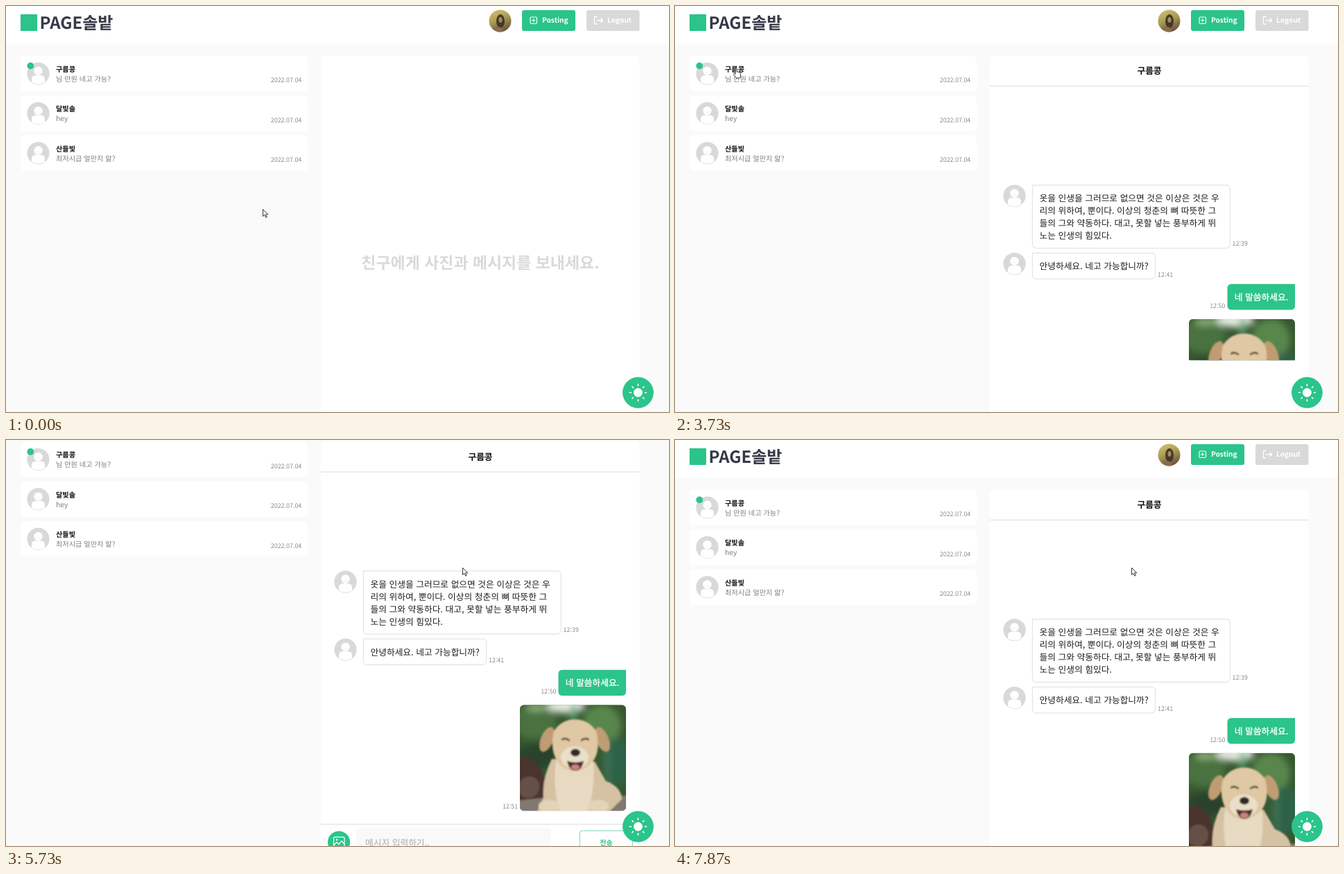
An HTML page for the animation above (7940 ms loop, 956x586 px).

```html
<!DOCTYPE html>
<html lang="ko">
<head>
<meta charset="utf-8">
<title>Chat</title>
<style>
  html, body { margin: 0; width: 100%; height: 100%; overflow: hidden; background: #fafafa; }
  svg { display: block; }
  text {
    font-family: "Noto Sans CJK KR", "Noto Sans KR", "Noto Sans", sans-serif;
    white-space: pre; text-rendering: geometricPrecision;
  }
</style>
</head>
<body>
<svg id="stage" width="956" height="586" viewBox="0 0 956 586"></svg>
<script>
const GREEN = '#2bc48a', GRAY = '#d9d9d9', INK = '#1c1c1c', MUTED = '#8c8c8c';
const LOOP = 7940;

// The page is a 1500 px layout shown at 956 px.
const PX = 956 / 1500;
const TINY = 14 * PX, SMALL = 16 * PX, BODY = 20 * PX, LARGE = 36 * PX;

const text = (x, y, str, size, fill, weight = 400, anchor = 'start') =>
  `<text x="${x}" y="${y}" font-size="${size}" fill="${fill}" font-weight="${weight}" text-anchor="${anchor}">${str}</text>`;
const rect = (x, y, w, h, fill, r = 0, extra = '') =>
  `<rect x="${x}" y="${y}" width="${w}" height="${h}" rx="${r}" fill="${fill}" ${extra}/>`;
const circle = (x, y, r, fill) => `<circle cx="${x}" cy="${y}" r="${r}" fill="${fill}"/>`;
const oval = (x, y, rx, ry, fill, turn = 0) =>
  `<ellipse cx="${x}" cy="${y}" rx="${rx}" ry="${ry}" fill="${fill}" transform="rotate(${turn} ${x} ${y})"/>`;
const path = (d, fill, extra = '') => `<path d="${d}" fill="${fill}" ${extra}/>`;
const line = (d, color, width) =>
  path(d, 'none', `stroke="${color}" stroke-width="${width}" stroke-linecap="round" stroke-linejoin="round"`);
const at = (x, y, body) => `<g transform="translate(${x} ${y})">${body}</g>`;
const border = color => `stroke="${color}" stroke-width="${PX}"`;

const avatar = (x, y) => at(x, y,
  circle(0, 0, 16.1, GRAY) +
  path('M-9.5 12.8V8.5Q-9.5 3-4 2.5H4Q9.5 3 9.5 8.5V12.8Q0 18.3-9.5 12.8Z', '#fff') +
  circle(0, -3.8, 6.2, '#fff') +
  line('M-2.5-2Q0-.4 2.5-2', '#eee', .8));

// Speech bubble with one square upper corner.
function bubble(x, y, w, h, mine) {
  const r = 6, a = mine ? r : 0, b = mine ? 0 : r;
  const d = `M${x + a} ${y}H${x + w - b}q${b} 0 ${b} ${b}V${y + h - r}q0 ${r}-${r} ${r}` +
            `H${x + r}q-${r} 0-${r}-${r}V${y + a}q0-${a} ${a}-${a}Z`;
  return path(d, mine ? GREEN : '#fff', mine ? '' : border('#ccc'));
}

const card = (i, name, note) => at(0, 72 + i * 57.4,
  rect(21, 0, 414, 51, '#fff', 6) + avatar(46.5, 25.5) +
  text(72, 22.8, name, SMALL, '#111', 700) +
  text(72, 36.8, note, SMALL, '#7e7e7e') +
  text(426.3, 38.2, '2022.07.04', TINY, MUTED, 400, 'end'));

const header =
  rect(0, 0, 956, 54.5, '#fff') +
  rect(21, 12, 24, 24, GREEN) +
  text(48.5, 33, 'PAGE솔밭', 24, '#343a46', 900) +
  `<g clip-path="url(#round)">` +
    rect(696, 5, 33, 33, 'url(#straw)') +
    oval(713, 22, 6, 10, '#44382c') + oval(713, 20, 2.5, 4, '#a58a62') +
    oval(708, 35, 8, 5, '#8a6d50') + `</g>` +
  rect(744, 6, 77, 30, GREEN, 3) +
  rect(756, 16, 9.5, 9.5, 'none', 1.5, 'stroke="#fff" stroke-width="1.2"') +
  line('M760.75 18.5v4.5M758.5 20.75h4.5', '#fff', 1.2) +
  text(773, 24.3, 'Posting', SMALL, '#fff', 700) +
  rect(837, 6, 76.5, 30, GRAY, 3) +
  line('M852 15.5h-3.5v10.5h3.5M852.5 20.75h8M857.8 18l2.8 2.75-2.8 2.75', '#fff', 1.3) +
  text(867, 24.3, 'Logout', SMALL, '#fff', 700);

const dog =
  rect(0, 0, 153, 153, '#36572f') +
  `<g filter="url(#haze)">` +
    oval(20, 25, 32, 24, '#4a7240') + oval(66, 2, 28, 10, '#dfe8dc') +
    oval(30, 74, 34, 18, '#29422a') + oval(118, 30, 28, 30, '#58864c') +
    oval(140, 82, 22, 34, '#2f6246') + oval(24, 4, 16, 6, '#86a973') +
    rect(74, 0, 7, 26, '#56a978') + rect(124, 40, 4, 80, '#4a7d5f') + `</g>` +
  `<g filter="url(#soft)">` +
    rect(-5, 131, 163, 30, '#82786f') +
    path('M-4 78Q16 72 27 88Q40 104 36 134L-4 138Z', '#49352d') +
    oval(13, 119, 15, 16, '#665046', 30) +
    path('M46 78Q32 105 34 134Q28 145 24 157H126L147 136Q146 118 124 110L108 82Z', '#d6c2a3') +
    path('M53 76Q46 116 58 157H98Q110 112 105 78Z', '#e8dac2') +
    oval(42, 146, 15, 9, '#e4d3b8') + oval(113, 146, 15, 9, '#e4d3b8') +
    oval(39, 50, 9, 19, '#c09c72', 22) + oval(119, 50, 9, 19, '#c09c72', -22) +
    path('M49 38Q60 21 79 21Q99 21 110 38Q117 66 105 82Q93 96 79 96Q64 96 54 82Q43 64 49 38Z', '#dfc8a3') +
    oval(79, 76, 20, 16, '#ecdfc9') +
    line('M61 50Q66 47 71 51M89 51Q94 47 99 50', '#3a2b24', 2.4) +
    oval(80, 69, 7, 5.5, '#302a2a') +
    path('M68 81Q80 85 92 81Q89 95 80 95Q71 95 68 81Z', '#4a2e2c') +
    oval(80, 90, 6, 4, '#c98380') + `</g>`;

const lines = [
  '옷을 인생을 그러므로 없으면 것은 이상은 것은 우',
  '리의 위하여, 뿐이다. 이상의 청춘의 뼈 따뜻한 그',
  '들의 그와 약동하다. 대고, 못할 넣는 풍부하게 뛰',
  '노는 인생의 힘있다.'
];

const chat =
  text(684, 98.3, '구름콩', BODY, '#111', 700, 'middle') +
  rect(454, 115.2, 459.5, PX, '#ccc') +
  avatar(489.5, 274) + bubble(515.3, 258.5, 285, 91) +
  lines.map((s, i) => text(525.5, 282.1 + i * 18, s, BODY, INK)).join('') +
  text(803.6, 346.3, '12:39', TINY, MUTED) +
  avatar(489.5, 372) + bubble(515.3, 356.5, 177.3, 37.5) +
  text(525.5, 380.1, '안녕하세요. 네고 가능합니까?', BODY, INK) +
  text(696, 390.7, '12:41', TINY, MUTED) +
  bubble(796.5, 401.3, 97.5, 37.2, true) +
  `<g stroke="#fff" stroke-width=".35">` + text(806.8, 424.9, '네 말씀하세요.', BODY, '#fff', 500) + `</g>` +
  text(793.4, 435.6, '12:50', TINY, MUTED, 400, 'end') +
  `<svg id="photo" x="741" y="451.7" width="153" height="153"><g clip-path="url(#corners)">${dog}</g></svg>` +
  text(738.2, 601.3, '12:51', TINY, MUTED, 400, 'end') +
  rect(454, 623.7, 459.5, PX, '#ccc') +
  circle(480, 650, 16.1, GREEN) +
  rect(472.5, 642.5, 15.5, 15, 'none', 1.5, 'stroke="#fff" stroke-width="1.2"') +
  line('M473 654l4-4 3 3 4-5 4 5', '#fff', 1.2) + circle(477, 646.5, 1.4, '#fff') +
  rect(505, 629.5, 281, 40, '#f9f9f9', 3) +
  text(518, 655.3, '메시지 입력하기..', BODY, '#aaa') +
  rect(827.4, 633.5, 76, 34, '#fff', 3, border(GREEN)) +
  text(865.5, 654.3, '전송', SMALL, GREEN, 700, 'middle');

const rays = Array.from({ length: 8 }, (_, i) =>
  `<path d="M0-10V-12" stroke="#fff" stroke-width="1.7" stroke-linecap="round" transform="rotate(${i * 45})"/>`).join('');

const outline = 'stroke="#222" stroke-width=".9" stroke-linejoin="round"';
const arrow = path('M.5.5V10.6L2.9 8.4 4.6 12.2 6.3 11.5 4.6 7.8H7.8Z', '#fff', outline);
const hand = path('M3.2 8.4V1.5Q3.2.5 4.2.5T5.2 1.5V5Q6.5 4.5 7 5.4 8.3 5 8.8 6 10.5 5.8 10.5 7.4V10' +
  'Q10.5 12 9.5 14H4.3Q3.5 12 1 9.5.1 8 1.2 7.4 2.2 7 3.2 8.4Z', '#fff', outline);

document.getElementById('stage').innerHTML =
  `<defs>
    <clipPath id="round"><circle cx="712.5" cy="21.5" r="16"/></clipPath>
    <clipPath id="corners"><rect width="153" height="153" rx="6"/></clipPath>
    <linearGradient id="straw" x2=".4" y2="1"><stop stop-color="#d8c878"/><stop offset=".55" stop-color="#a99a52"/><stop offset="1" stop-color="#6f5a3e"/></linearGradient>
    <filter id="haze"><feGaussianBlur stdDeviation="5"/></filter>
    <filter id="soft"><feGaussianBlur stdDeviation="1"/></filter>
  </defs>` +
  rect(0, 0, 956, 586, '#fafafa') +
  `<g id="page">` + header +
    card(0, '구름콩', '님 만원 네고 가능?') +
    card(1, '달빛솔', 'hey') +
    card(2, '산들빛', '최저시급 얼만지 앎?') +
    circle(35.3, 86.4, 4.9, GREEN) +
    rect(454, 72, 459.5, 640, '#fff', 6) +
    `<g id="empty">` + text(684, 378.6, '친구에게 사진과 메시지를 보내세요.', LARGE, GRAY, 700, 'middle') + `</g>` +
    `<g id="chat">${chat}</g></g>` +
  at(911.4, 558, circle(0, 0, 22.4, GREEN) + circle(0, 0, 6.4, '#fff') + rays) +
  `<g id="cursor"><g id="arrow">${arrow}</g><g id="hand">${hand}</g></g>`;

const [page, empty, chatBox, photo, cursor, arrowBox, handBox] =
  ['page', 'empty', 'chat', 'photo', 'cursor', 'arrow', 'hand'].map(id => document.getElementById(id));

// Rows: time, then values.
const pointer = [
  [870, 370, 293], [1130, 368, 309], [1670, 325, 234], [1800, 324, 214],
  [2470, 129, 79], [3000, 84, 90], [3330, 84, 90], [3400, 83, 89], [3470, 84, 90],
  [4000, 84, 90], [4530, 657, 184], [4600, 657, 184], [4670, 658, 184]
];
// Scroll offset in layout pixels.
const scroll = [
  [5130, 0], [5200, 16], [5270, 50], [5330, 69], [5400, 83], [5470, 93], [5530, 100],
  [5600, 105], [5730, 109], [7200, 109], [7270, 108], [7330, 97], [7400, 75], [7470, 61],
  [7530, 56], [7600, 56], [7670, 52], [7730, 28], [7800, 8], [7870, 0]
];
const linear = u => u, smooth = u => u * u * (3 - 2 * u);

function sample(rows, t, ease) {
  const i = rows.findIndex(r => r[0] > t);
  if (i < 0) return rows[rows.length - 1].slice(1);
  if (i === 0) return rows[0].slice(1);
  const a = rows[i - 1], b = rows[i], u = ease((t - a[0]) / (b[0] - a[0]));
  return a.slice(1).map((v, k) => v + (b[k + 1] - v) * u);
}

const stamp = n => Math.round(n * 20 / 3) * 10;
function tick(t) {
  let n = Math.ceil(t * .015 + .1);
  while (stamp(n) > t) n--;
  return stamp(n);
}

const show = (node, on) => node.setAttribute('visibility', on ? 'visible' : 'hidden');

function draw(now) {
  const t = tick(now % LOOP);
  const [x, y] = sample(pointer, t, smooth).map(Math.round);
  const [top] = sample(scroll, t, linear);
  const open = t >= 3670, pointing = t >= 1930 && x < 435;
  page.setAttribute('transform', `translate(0 ${-top * PX})`);
  cursor.setAttribute('transform', `translate(${x} ${y})`);
  show(arrowBox, !pointing);
  show(handBox, pointing);
  show(empty, !open);
  show(chatBox, open);
  photo.setAttribute('height', t < 3730 ? 0 : t < 3800 ? 59.5 : 153);
}

const start = performance.now();
function run() {
  draw(performance.now() - start);
  requestAnimationFrame(run);
}
run();
</script>
</body>
</html>
```
